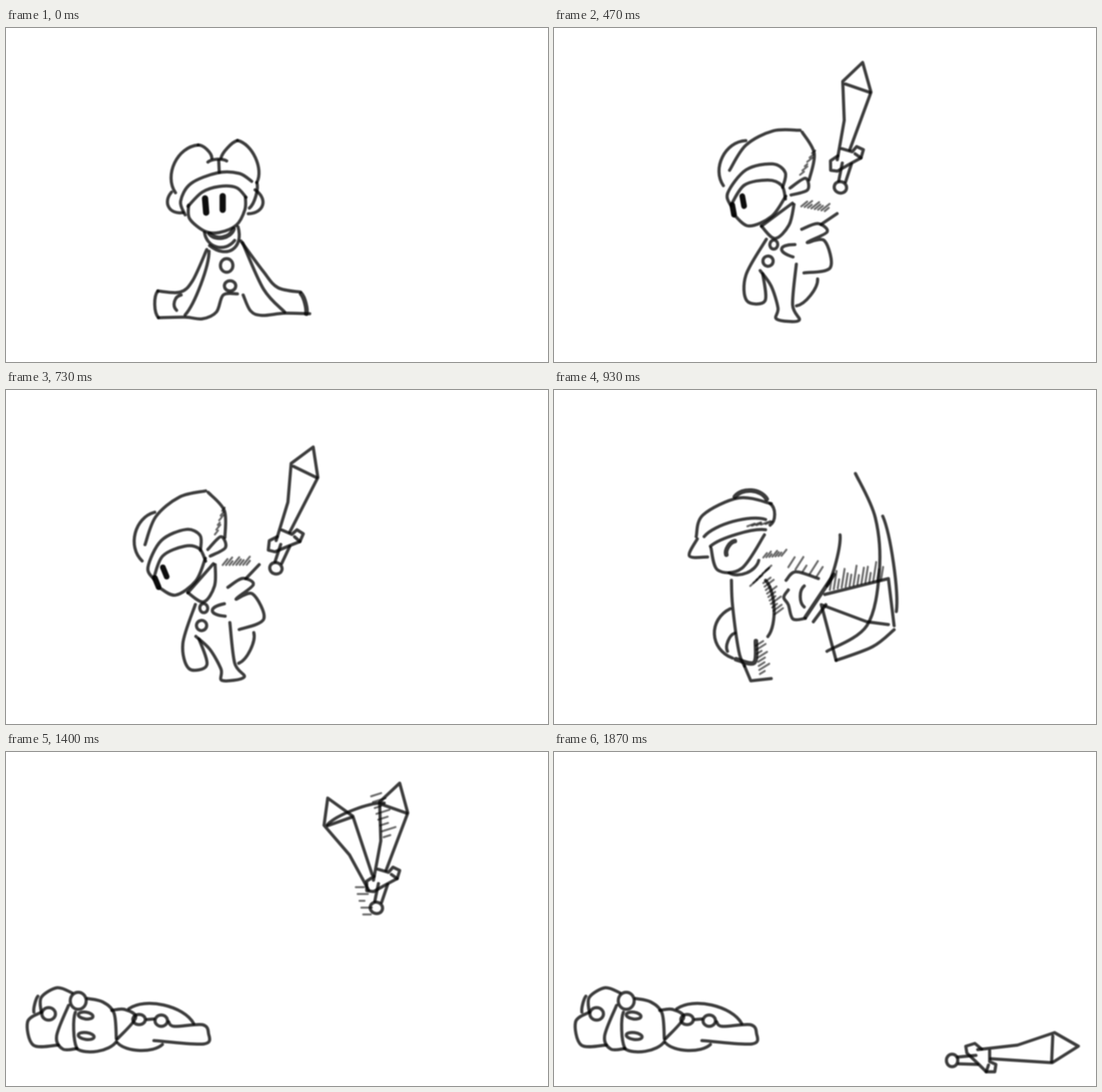
These frames come from a looping animation (953 px wide and 588 px high, 1.94 s). An HTML page with a canvas:

```html
<!DOCTYPE html>
<html lang="en">
<head>
<meta charset="utf-8">
<title>Sword toss sketch</title>
<style>
html, body { margin: 0; width: 100%; height: 100%; overflow: hidden; background: #fff; }
canvas { display: block; filter: blur(1.1px); }
</style>
</head>
<body>
<canvas id="stage" width="953" height="588"></canvas>
<script>
const ctx = document.getElementById('stage').getContext('2d');
const LOOP = 1940, LAST = 28;
const rad = deg => deg * Math.PI / 180;

function ink(width = 5.5) {
  ctx.lineWidth = width;
  ctx.globalAlpha = width > 8 ? .95 : .77;
}

function stroke(trace) {
  ctx.beginPath();
  trace();
  ctx.stroke();
}

function line(...p) {
  stroke(() => { for (let i = 0; i < p.length; i += 2) ctx.lineTo(p[i], p[i + 1]); });
}

// Smooth curve through the points.
function curve(...p) {
  const last = p.length / 2 - 1;
  const at = i => { i = Math.max(0, Math.min(last, i)); return [p[2 * i], p[2 * i + 1]]; };
  stroke(() => {
    ctx.moveTo(p[0], p[1]);
    for (let i = 0; i < last; i++) {
      const [a, b, c, d] = [at(i - 1), at(i), at(i + 1), at(i + 2)];
      ctx.bezierCurveTo(b[0] + (c[0] - a[0]) / 6, b[1] + (c[1] - a[1]) / 6,
        c[0] - (d[0] - b[0]) / 6, c[1] - (d[1] - b[1]) / 6, c[0], c[1]);
    }
  });
}

// Single arch; a positive bulge lies to the left of the direction of travel.
function bow(x0, y0, x1, y1, bulge) {
  const dx = x1 - x0, dy = y1 - y0, k = bulge / .75 / Math.hypot(dx, dy);
  stroke(() => {
    ctx.moveTo(x0, y0);
    ctx.bezierCurveTo(x0 + dx * .2 + dy * k, y0 + dy * .2 - dx * k,
      x1 - dx * .2 + dy * k, y1 - dy * .2 - dx * k, x1, y1);
  });
}

function ring(x, y, rx, ry, deg = 0) {
  stroke(() => ctx.ellipse(x, y, rx, ry, rad(deg), 0, 7));
}

function hatch(x0, y0, x1, y1, count, dx, dy) {
  ctx.lineWidth = 3.5;
  ctx.globalAlpha = .6;
  for (let i = 0; i < count; i++) {
    const u = i / (count - 1), k = .8 + .3 * Math.sin(i * 2.4);
    const x = x0 + (x1 - x0) * u, y = y0 + (y1 - y0) * u;
    line(x, y, x + dx * k, y + dy * k);
  }
  ink();
}

function place(x, y, deg, pivotX, pivotY, stretch, paint) {
  ctx.save();
  ctx.translate(x, y);
  ctx.rotate(rad(deg));
  ctx.scale(1, stretch);
  ctx.translate(-pivotX, -pivotY);
  ink();
  paint();
  ctx.restore();
}

function head() {
  bow(298, 290, 338, 206, 24);
  bow(338, 206, 362, 229, 5);
  bow(378, 229, 407, 198, 4);
  bow(407, 198, 441, 272, 16);
  bow(441, 272, 428, 317, 5);
  curve(315, 329, 307, 305, 325, 274, 372, 255, 410, 256, 432, 270);
  curve(320, 314, 345, 289, 375, 279, 405, 281, 422, 298);
  curve(321, 312, 323, 336, 350, 358, 375, 360, 405, 347, 420, 320, 421, 298);
  bow(355, 236, 388, 234, 4);
  line(374, 233, 375, 254);
  ink(11);
  line(350, 300, 352, 325);
  line(381, 296, 381, 320);
  ink();
}

function sad() {
  head();
  bow(291, 289, 311, 325, -17);
  bow(438, 285, 426, 327, 20);
  bow(349, 360, 402, 374, -19);
  bow(408, 350, 358, 383, 28);
  ring(388, 418, 11, 12);
  ring(394, 454, 10, 9);
  curve(353, 390, 328, 445, 306, 465, 267, 463);
  bow(267, 463, 268, 510, -6);
  curve(268, 510, 315, 509, 345, 512, 370, 500, 382, 470, 407, 468);
  bow(357, 393, 315, 505, 7);
  bow(308, 470, 300, 497, -8);
  curve(413, 375, 452, 428, 478, 457, 518, 465);
  curve(534, 503, 490, 502, 450, 506, 430, 498, 417, 470);
  curve(416, 378, 453, 460, 490, 500);
  ink(8);
  bow(358, 362, 400, 354, -11);
  bow(519, 468, 528, 503, 3);
}

function heave() {
  place(-4, -41, 0, 0, 0, 1, head);
  bow(346, 318, 376, 339, -16);
  curve(353, 348, 370, 363, 397, 338, 409, 297);
  line(320, 300, 318, 323, 340, 317);
  ring(368, 375, 10, 10);
  ring(361, 410, 10, 11);
  curve(354, 362, 325, 387, 276, 400, 232, 407);
  curve(232, 407, 238, 452, 268, 474, 294, 460);
  bow(303, 461, 363, 438, 2);
  curve(354, 366, 318, 415, 292, 424);
  bow(285, 424, 294, 459, -6);
  curve(358, 428, 381, 470, 385, 513);
  curve(428, 326, 414, 352, 415, 470, 417, 510);
  line(384, 308, 445, 281);
  curve(418, 350, 440, 334, 478, 315);
  curve(486, 262, 473, 290, 492, 300, 508, 290, 504, 264);
  curve(480, 300, 480, 343, 530, 328, 550, 290, 532, 262);
  line(480, 343, 436, 386);
  hatch(440, 250, 450, 335, 7, 16, -20);
  ink(8);
  bow(362, 326, 384, 313, -4);
}

function heaveSword() {
  line(364, 155, 411, 92);
  bow(418, 89, 517, 195, 42);
  curve(372, 152, 392, 128, 428, 113, 419, 140, 453, 130, 463, 136);
  line(459, 145, 474, 147, 471, 212);
  curve(441, 222, 450, 206, 480, 205, 492, 193, 505, 202, 549, 201);
  curve(441, 222, 470, 220, 530, 208, 550, 220, 538, 255, 528, 265);
  bow(492, 215, 494, 258, 2);
  bow(456, 228, 454, 282, -3);
  ink(3.5);
  bow(456, 97, 497, 185, 18);
}

function drag() {
  bow(299, 205, 268, 288, -24);
  curve(276, 260, 300, 213, 345, 183, 392, 177);
  curve(396, 180, 421, 215, 417, 262);
  curve(285, 322, 277, 300, 305, 256, 350, 241, 374, 254, 372, 280);
  curve(286, 318, 305, 283, 345, 270, 370, 277, 379, 300);
  curve(379, 295, 358, 333, 320, 354, 292, 337);
  curve(385, 280, 410, 260, 416, 280, 388, 292);
  hatch(400, 255, 417, 215, 6, 8, -8);
  line(392, 306, 342, 352);
  curve(395, 308, 390, 345, 368, 371, 342, 352);
  ring(367, 382, 7, 8);
  ring(360, 412, 9, 9);
  curve(353, 374, 324, 440, 330, 485, 362, 482, 353, 435);
  curve(348, 430, 370, 455, 386, 492, 386, 512, 425, 510, 411, 484, 410, 412);
  bow(450, 434, 418, 485, 8);
  curve(413, 350, 440, 337, 458, 350, 425, 372, 455, 366, 470, 412, 425, 426);
  bow(404, 378, 403, 400, -22);
  line(446, 338, 472, 316);
  hatch(408, 310, 450, 314, 8, 12, -12);
  ink(10);
  line(287, 320, 292, 337);
  line(303, 303, 308, 320);
}

function dragSword() {
  line(472, 316, 476, 338, 493, 355, 488, 366, 509, 390, 472, 411);
  bow(483, 331, 548, 272, -4);
  line(494, 342, 565, 282);
  line(490, 366, 598, 324);
  line(548, 270, 580, 271, 618, 264, 598, 324, 570, 284, 618, 266);
  line(548, 272, 570, 284);
  bow(515, 220, 550, 268, 3);
}

function swing() {
  curve(250, 258, 262, 220, 325, 190, 382, 200);
  bow(380, 200, 380, 238, 8);
  bow(264, 258, 372, 228, 12);
  bow(275, 275, 372, 246, 7);
  curve(276, 278, 288, 317, 330, 314, 370, 255);
  curve(252, 262, 238, 292, 270, 294);
  bow(308, 322, 360, 300, -12);
  hatch(340, 240, 372, 236, 5, 16, -6);
  curve(312, 335, 314, 380, 325, 460, 335, 486);
  bow(310, 385, 314, 472, -30);
  bow(318, 428, 305, 460, -6);
  line(335, 486, 346, 512, 382, 508);
  bow(372, 335, 376, 434, 13);
  hatch(368, 295, 400, 292, 7, 8, -10);
  hatch(345, 345, 372, 318, 6, 16, -14);
  hatch(368, 340, 388, 395, 10, 16, -12);
  hatch(355, 450, 362, 500, 8, 16, -10);
  curve(408, 335, 425, 320, 465, 332);
  curve(412, 352, 404, 365, 412, 378, 420, 403, 442, 402);
  bow(440, 345, 440, 382, -7);
  hatch(412, 312, 462, 328, 5, 14, -22);
  ink(8);
  bow(318, 188, 374, 192, 13);
  bow(318, 266, 303, 290, -5);
  curve(355, 442, 352, 480, 320, 474);
}

function swingSword() {
  line(456, 408, 478, 378);
  line(476, 360, 588, 332, 598, 415);
  curve(598, 422, 560, 452, 496, 476);
  line(496, 476, 470, 378, 550, 408, 588, 413);
  curve(480, 460, 550, 415, 572, 320, 565, 225, 530, 147);
  bow(578, 222, 602, 390, 7);
  bow(503, 255, 480, 345, 5);
  hatch(485, 352, 575, 335, 14, 5, -32);
  ink(7);
  line(442, 400, 492, 325);
}

function thrown() {
  curve(55, 320, 70, 360, 120, 381, 143, 378);
  ring(45, 274, 21, 20);
  ring(125, 230, 42, 14, -42);
  line(110, 255, 112, 282);
  line(132, 240, 182, 282);
  curve(182, 282, 142, 335, 165, 393);
  bow(180, 345, 224, 346, 7);
  bow(182, 282, 262, 312, 14);
  hatch(28, 290, 56, 302, 6, 5, 16);
  hatch(68, 306, 135, 285, 11, 12, -8);
  hatch(160, 310, 250, 305, 13, 25, -25);
  curve(272, 318, 235, 340, 230, 420, 255, 460);
  bow(272, 320, 232, 388, 15);
  ring(279, 376, 10, 10);
  ring(295, 396, 12, 11);
  curve(235, 390, 290, 350, 355, 386, 358, 445, 328, 458);
  curve(240, 395, 285, 475, 328, 503, 335, 515, 372, 505, 372, 495, 322, 450, 315, 405);
  curve(378, 362, 390, 430, 345, 455);
  hatch(290, 358, 350, 382, 8, 12, 14);
  hatch(346, 392, 354, 450, 9, 16, -14);
  curve(280, 338, 325, 305, 342, 328);
  curve(323, 300, 328, 278, 355, 267);
  line(342, 355, 380, 340);
  curve(375, 345, 430, 360, 470, 318);
  curve(376, 265, 390, 226, 412, 240);
  bow(345, 300, 442, 282, 8);
  bow(395, 320, 425, 300, -9);
  hatch(375, 295, 455, 275, 13, 14, -16);
  ink(8);
  line(180, 345, 224, 347);
  curve(215, 393, 168, 365, 185, 308, 256, 320);
  line(386, 497, 389, 495);
  line(401, 505, 408, 503);
}

function thrownSword() {
  curve(478, 260, 600, 340, 625, 349);
  line(590, 366, 635, 366);
  curve(635, 366, 656, 290, 654, 220);
  curve(655, 382, 677, 270, 648, 140);
  curve(648, 125, 645, 180, 640, 248);
  bow(500, 240, 640, 178, -16);
  hatch(460, 240, 575, 232, 10, 9, -32);
  hatch(595, 215, 635, 200, 5, 6, -45);
  ink(9);
  line(468, 272, 590, 385, 655, 382);
}

function lying() {
  curve(62, 458, 38, 475, 48, 516, 92, 516);
  ring(75, 461, 12, 11);
  curve(62, 458, 62, 432, 90, 415, 116, 424);
  bow(49, 458, 56, 430, 2);
  ring(127, 438, 14, 15);
  curve(110, 446, 89, 500, 100, 523, 125, 522);
  bow(122, 458, 124, 520, -4);
  curve(143, 434, 170, 440, 190, 460, 194, 505);
  bow(124, 522, 194, 510, -11);
  ring(140, 464, 13, 6, 8);
  ring(141, 500, 14, 6, 8);
  curve(186, 455, 208, 453, 228, 468, 196, 505);
  ring(234, 471, 11, 9);
  ring(273, 473, 11, 10);
  line(248, 471, 260, 470);
  curve(286, 475, 296, 483, 345, 480, 356, 495, 348, 514, 260, 508);
  bow(216, 452, 330, 478, 20);
  bow(196, 512, 275, 515, -12);
}

function blade() {
  line(745, 524, 815, 516, 880, 494, 922, 518, 876, 547, 768, 540);
  line(877, 500, 875, 545);
}

function sword() {
  blade();
  ring(700, 543, 10, 11);
  line(710, 537, 742, 534);
  line(712, 549, 745, 550);
  line(752, 523, 740, 513, 724, 518, 726, 530, 745, 548, 760, 563, 775, 563, 777, 550, 766, 545, 766, 526);
  line(760, 563, 764, 551);
}

// Trailing blade and speed lines at the top of the flight.
function trail() {
  place(645, 240, -112, 745, 532, 1, blade);
  bow(565, 128, 665, 90, 8);
  hatch(642, 78, 664, 150, 8, 22, -7);
  hatch(615, 238, 628, 286, 5, 18, 0);
}

// Drift, turn and stretch grow per frame away from the key frame.
const shots = [
  { from: 0, key: 0, pose: sad, stretch: .03 },
  { from: 3, key: 4, pose: heave, dx: 2, turn: 2 },
  { from: 7, key: 9, pose: drag, dx: -3, turn: -3 },
  { from: 12, key: 14, pose: swing, dx: -5, turn: -2 },
  { from: 16, key: 17, pose: thrown, dx: 3, dy: 8, turn: -2 },
  { from: 19, key: 21, pose: lying, dx: 2, dy: 28 },
  { from: 22, key: 28, pose: lying, dx: 1 }
];

const extras = { 3: heaveSword, 4: heaveSword, 9: dragSword, 14: swingSword, 17: thrownSword, 21: trail };

// Free sword: frame, centre x and y, angle.
const flight = [
  [5, 468, 139, -110], [6, 502, 130, -92], [8, 537, 232, -55], [10, 531, 274, -45],
  [12, 474, 160, -88], [15, 519, 403, 50], [16, 500, 165, -68],
  [18, 575, 250, 145], [21, 668, 175, 287], [24, 790, 470, 408], [28, 800, 530, 360]
];

function swordAt(f) {
  const i = flight.findIndex(k => k[0] >= f), b = flight[i], a = flight[i - 1] || b;
  const u = a === b ? 0 : (f - a[0]) / (b[0] - a[0]);
  return a.map((v, j) => v + (b[j] - v) * u).slice(1);
}

function render(f) {
  ctx.clearRect(0, 0, 953, 588);
  const { key, pose, dx = 0, dy = 0, turn = 0, stretch = 0 } = shots.findLast(s => s.from <= f);
  const n = f - key;
  const put = paint => place(380 + dx * n, 510 + dy * n, turn * n, 380, 510, 1 + stretch * n, paint);
  put(pose);
  if (extras[f]) put(extras[f]);
  if (f > 4 && (!extras[f] || extras[f] === trail)) place(...swordAt(f), 800, 530, 1, sword);
}

const startOf = f => Math.round(f * 20 / 3) * 10;

function tick() {
  const t = performance.now() % LOOP;
  let f = LAST;
  while (startOf(f) > t) f--;
  render(f);
  requestAnimationFrame(tick);
}

ctx.lineCap = ctx.lineJoin = 'round';
tick();
</script>
</body>
</html>
```
